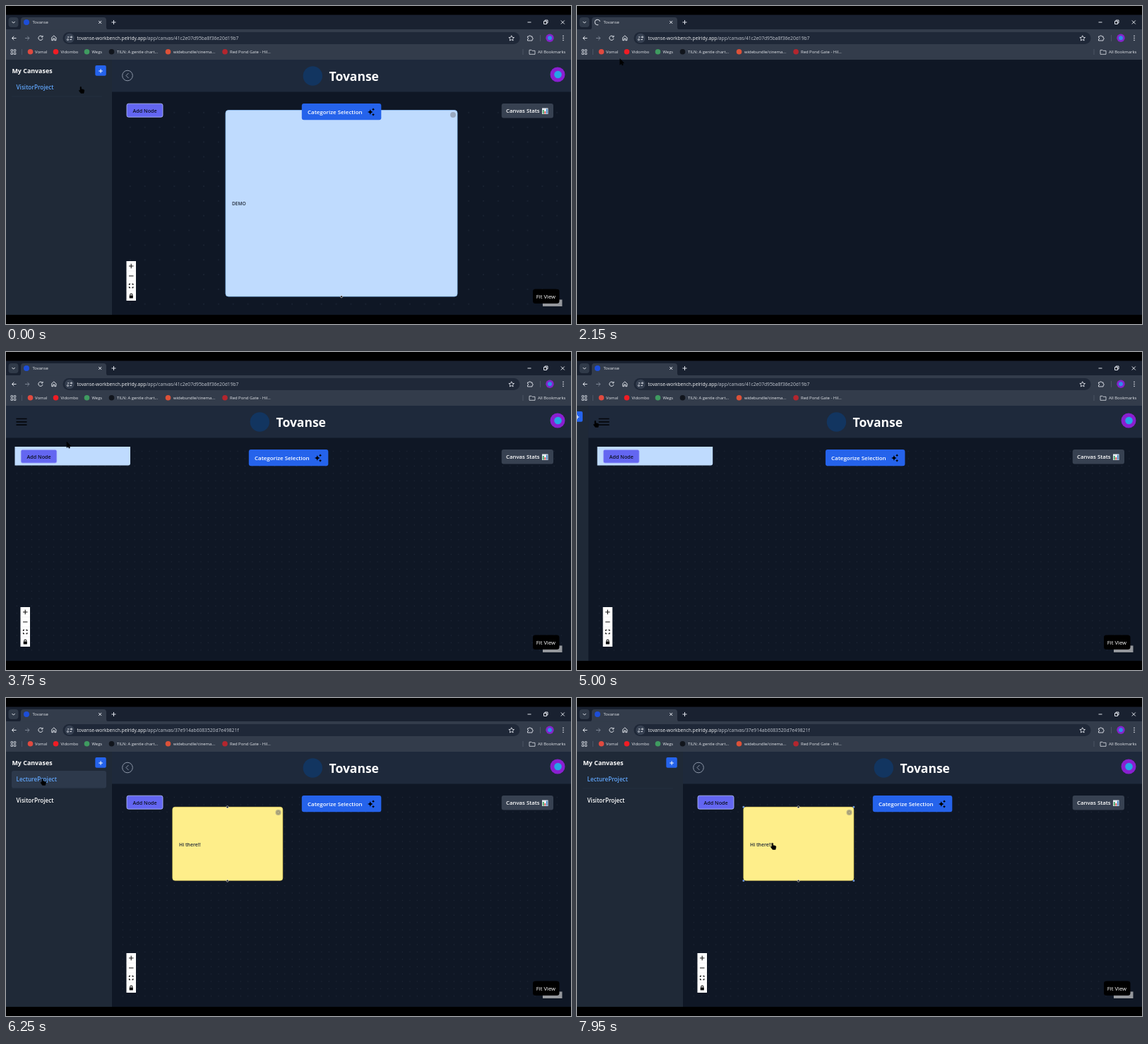
These frames come from a looping animation (800x450 px, 8000 ms). An HTML page:

```html
<!DOCTYPE html>
<html lang="en">
<head>
<meta charset="utf-8">
<title>Canvas workspace</title>
<style>
html, body { margin: 0; width: 100%; height: 100%; overflow: hidden; background: #000; }
svg { display: block; width: 100vw; height: 100vh; }
text { font-family: "Open Sans", "Noto Sans", sans-serif; fill: #fff; white-space: pre; }
.semi { font-weight: 600; }
.bold { font-weight: 700; }
.small text { font-size: 5.9px; fill: #e3e6eb; }
.line { fill: none; stroke: #dfe3ea; stroke-width: 1; }
.dark { fill: none; stroke: #111; stroke-width: 1.1; }
</style>
</head>
<body>
<svg viewBox="0 0 800 450">
  <defs>
    <pattern id="dots" width="10.42" height="10.42" patternUnits="userSpaceOnUse">
      <circle cx="5" cy="5" r=".5" fill="#2d3748"/>
    </pattern>
    <pattern id="bigDots" width="20.84" height="20.84" patternUnits="userSpaceOnUse">
      <circle cx="5" cy="5" r=".7" fill="#263142"/>
    </pattern>
    <path id="star" d="M0-4Q.6-.6 4 0Q.6.6 0 4Q-.6.6-4 0Q-.6-.6 0-4Z"/>
    <clipPath id="stage"><rect y="76" width="800" height="361"/></clipPath>
  </defs>
  <rect width="800" height="450"/>

  <g id="page" clip-path="url(#stage)">
    <rect y="76" width="800" height="361" fill="#0f1725"/>

    <g id="loading">
      <path id="spinner" d="M11.3-11.3A16 16 0 1 1-11.3-11.3" fill="none" stroke="#3b82f6" stroke-width="2.2"/>
      <text id="loadingText" x="400" y="281" font-size="8.7" text-anchor="middle">Loading Tovanse...</text>
    </g>

    <g id="app">
      <g class="full">
        <rect id="grid" x="12" y="134" width="775" height="291" fill="url(#dots)"/>
      </g>
      <rect y="76" width="800" height="45.5" fill="#1e293b"/>

      <g id="bigNode">
        <rect x="311" y="147.5" width="328" height="263.5" rx="4" fill="#bfdbfe" stroke="#93c5fd" stroke-width=".8"/>
        <circle cx="633" cy="154" r="4" fill="#9aa9bf"/>
        <circle cx="475" cy="411.3" r="1.5" fill="#111" stroke="#fff" stroke-width=".6"/>
        <text class="semi" x="320" y="282" font-size="6.6" style="fill:#1f2937">DEMO</text>
      </g>
      <path id="cutNode" class="full" d="M12.5 134H176V157.500Q176 160.500 173 160.500H12.500Z" fill="#bfdbfe"/>
      <g id="note">
        <rect x="235.800" y="154.300" width="156" height="104" rx="3.500" fill="#feee8a" stroke="#f3dc62" stroke-width=".6"/>
        <circle cx="385.500" cy="162" r="4" fill="#b9b184"/>
        <circle cx="385.500" cy="162" r="2" fill="none" stroke="#8d8868" stroke-width=".7"/>
        <g fill="#111" stroke="#fff" stroke-width=".6">
          <circle cx="313.500" cy="154.300" r="1.500"/><circle cx="313.500" cy="258.700" r="1.500"/>
        </g>
        <path id="corners" d="M234.800 153.300h2v2h-2zM390.800 153.300h2v2h-2zM234.800 257.500h2v2h-2zM390.800 257.500h2v2h-2z" fill="#3b82f6" stroke="#fff" stroke-width=".3"/>
        <text class="semi" x="245" y="209.500" font-size="6.900" style="fill:#1f2937">Hi there!!</text>
      </g>

      <g class="full">
        <rect x="21" y="138.200" width="51" height="19" rx="2.500" fill="#6366f1" stroke="#b4c0fb" stroke-width=".8"/>
        <text class="semi" x="29.500" y="150.800" font-size="7.200" style="fill:#0b1020">Add Node</text>
        <path d="M20.500 361H34V417H20.500Z" fill="#fff"/>
        <path d="M20.500 375H34M20.500 389H34M20.500 403H34" stroke="#e5e7eb" stroke-width=".5"/>
        <path class="dark" d="M24 368H30.500M27.200 364.800V371.200M24 382H30.500M24.500 395V393.300H26.200M28.200 393.300H29.900V395M29.900 397V398.700H28.200M26.200 398.700H24.500V397"/>
        <path d="M24.700 409.500H29.800V413.500H24.700Z"/>
        <path class="dark" d="M25.800 409.500V408.500a1.500 1.500 0 0 1 3 0V409.500"/>
        <path id="menu" d="M14.500 94.500H29.500M14.500 98.800H29.500M14.500 103.100H29.500" stroke="#05070c" stroke-width="1.700"/>
        <g id="back" class="line" stroke-width=".9">
          <circle cx="22" cy="98.500" r="7.300" stroke="#8d97a8"/><path d="M23.500 95L20 98.500L23.500 102" stroke="#8d97a8"/>
        </g>
      </g>

      <g class="half">
        <circle cx="359.300" cy="99" r="13.700" fill="#123560"/>
        <text class="bold" x="382.500" y="106.300" font-size="17.500">Tovanse</text>
        <rect x="343.800" y="138" width="112.500" height="23.300" rx="3" fill="#2563eb"/>
        <text class="semi" x="352" y="152.900" font-size="7.950">Categorize Selection</text>
        <use href="#star" x="440.800" y="150"/>
        <use href="#star" transform="translate(445 146.300) scale(.5)"/>
        <use href="#star" transform="translate(445 153.800) scale(.5)"/>
      </g>

      <circle cx="781" cy="97" r="10.500" fill="#8a1fd0"/>
      <circle cx="781.500" cy="97" r="5.300" fill="#25a5e6"/>
      <rect x="701.700" y="138" width="73.300" height="20.500" rx="3" fill="#374151"/>
      <text class="semi" x="708" y="151.300" font-size="7.800">Canvas Stats</text>
      <path d="M759 144.500H767.500V153H759Z" fill="#e8edf3"/>
      <path d="M760.800 152.500V147" stroke="#37a05a" stroke-width="1.700"/>
      <path d="M763.300 152.500V149" stroke="#d84a4a" stroke-width="1.700"/>
      <path d="M765.800 152.500V145.500" stroke="#3b82c4" stroke-width="1.700"/>
      <path d="M760 415.500H787.500V425H760Z" fill="#94979c"/>
      <rect x="746" y="400.500" width="37.500" height="20.500" rx="3.500"/>
      <text x="750.800" y="413.600" font-size="7.700">Fit View</text>

      <g id="sidebar">
        <path d="M0 76H150V437H0Z" fill="#1f2937"/>
        <text class="bold" x="8.500" y="94.500" font-size="8.900">My Canvases</text>
        <rect x="126.300" y="84" width="15.500" height="14.700" rx="2" fill="#2563eb"/>
        <path d="M131.300 92H136.900M134.100 89.200V94.800" stroke="#fff" stroke-width="1"/>
        <rect id="row" x="8" y="103" width="134" height="24.500" rx="3" fill="#2d394b"/>
        <path d="M8 128H136" stroke="#263244" stroke-width=".7"/>
        <text id="first" class="semi" x="14.500" y="118.300" font-size="8.200"></text>
        <text id="second" class="semi" x="14.500" y="147.600" font-size="8.200">VisitorProject</text>
      </g>
    </g>
  </g>

  <g class="small">
    <path d="M0 12.500H800V34H0Z" fill="#192130"/>
    <path d="M0 33H800V76H0Z" fill="#333c4b"/>
    <path d="M18 33.500Q21 33 21 30V20Q21 16 25 16H138Q142 16 142 20V30Q142 33 145 33.500Z" fill="#333c4b"/>
    <rect x="3.500" y="16" width="14" height="14" rx="4" fill="#303a49"/>
    <path class="line" d="M8.500 22L10.600 24.200L12.700 22M131.200 21L135.200 25M135.200 21L131.200 25M149.500 23H155.500M152.500 20V26M738.500 23H743.500M761.500 21.500H765.500V25.500H761.500ZM763 21.500V20H767V24H765.500M785.800 20.500L790.800 25.500M790.800 20.500L785.800 25.500"/>
    <circle id="favicon" cx="29" cy="23" r="4" fill="#1d4ed8"/>
    <path id="tabSpinner" class="line" d="M0-3.700A3.700 3.700 0 1 1-3.700 0"/>
    <text x="37.500" y="25.300">Tovanse</text>

    <circle id="reloadHover" cx="49" cy="45.500" r="8.500" fill="#535e70"/>
    <path class="line" d="M14.500 45.500H8.500M11.300 42.700L8.500 45.500L11.300 48.300M51.500 43.500A3.100 3.100 0 1 0 52 46M52 41.800V44H49.800M64.800 45.500V48.700H66.800V46H68.800V48.700H70.800V45.500M64 45.500L67.800 42L71.600 45.500"/>
    <path class="line" d="M27 45.500H33M30.200 42.700L33 45.500L30.200 48.300" style="stroke:#7b8493"/>
    <rect x="80.500" y="37" width="647" height="17" rx="8.500" fill="#1f2838"/>
    <circle cx="90" cy="45.500" r="6.700" fill="#364051"/>
    <path class="line" d="M87 44H89.500M91.500 44a1 1 0 1 0 2 0a1 1 0 1 0-2 0M90.500 47.500H93M86.500 47.500a1 1 0 1 0 2 0a1 1 0 1 0-2 0"/>
    <text x="100.500" y="48" style="font-size:6.700px;fill:#f4f5f7">tovanse-workbench.pelridy.app<tspan id="path" fill="#c3c8d1"></tspan></text>
    <path class="line" stroke-linejoin="round" d="M715.700 41.800L716.800 44.300L719.500 44.600L717.500 46.400L718.100 49L715.700 47.600L713.300 49L713.900 46.400L711.900 44.600L714.600 44.300ZM738.500 43H740.500a1.200 1.200 0 0 1 2.400 0H745V45a1.200 1.200 0 0 1 0 2.400V49H738.500V47a1.100 1.100 0 0 0 0-2.200Z" style="stroke-width:.9"/>
    <path d="M756.500 41V50M22.500 61V69M732 61V69" stroke="#566071" stroke-width=".7"/>
    <circle cx="770" cy="45.300" r="5.700" fill="#8523c9"/><circle cx="770" cy="45.300" r="3" fill="#2f8ce8"/>
    <path d="M789 42.300v.1M789 45.300v.1M789 48.300v.1" stroke="#dfe3ea" stroke-width="1.500" stroke-linecap="round"/>

    <path class="line" d="M7 61.700H9.500V64.200H7ZM11.300 61.700H13.800V64.200H11.300ZM7 66H9.500V68.500H7ZM11.300 66H13.800V68.500H11.300ZM741 62.300H744L745 63.300H749V68.300H741Z" style="stroke-width:.8"/>
    <g id="bookmarks"></g>
    <text x="753" y="67.200">All Bookmarks</text>
  </g>

  <g id="cursor" stroke="#000" stroke-width=".5" stroke-linejoin="round">
    <path id="arrow" d="M0 0V8.500L2 6.800L3.200 9.300L4.600 8.600L3.500 6.200H6Z"/>
    <path id="hand" d="M1 .7Q1.800-.3 2.600.7V3.500L6 4.300Q7 4.700 6.800 6L6 9.500H2L-.6 6Q-.8 4.800 1 5.500Z"/>
  </g>
</svg>
<script>
const $ = id => document.getElementById(id);
const show = (id, on) => $(id).setAttribute('display', on ? 'inline' : 'none');
const move = (el, x, y = 0, turn = 0) => el.setAttribute('transform', `translate(${x} ${y}) rotate(${turn})`);
const ease = k => (k = Math.min(1, Math.max(0, k)), k * k * (3 - 2 * k));

// Icon x, text x, icon colour, label
$('bookmarks').innerHTML = [
  [34.5, 41, '#e04a3f', 'Vomal'],
  [70.5, 77.5, '#f01c24', 'Vidombo'],
  [114.5, 121.5, '#3f9b60', 'Wegs'],
  [149.5, 157, '#11151c', 'TILN: A gentle chart...'],
  [229.5, 237, '#dc5138', 'widebundle/cinema...'],
  [310, 317, '#b3262e', 'Red Pond Gate - Hil...']
].map(([icon, x, color, label]) =>
  `<circle cx="${icon}" cy="64.800" r="3.800" fill="${color}"/><text x="${x}" y="67.200">${label}</text>`).join('');

// Pointer stops: time, x, y
const stops = [
  [0, 104, 114], [1000, 104, 114], [1450, 47, 46], [1850, 47, 46], [2600, 86, 127], [3800, 86, 127],
  [4450, 24, 97], [5000, 24, 97], [5350, 33, 116], [5700, 33, 116], [6600, 58, 113], [7050, 58, 113],
  [7800, 275, 205], [8000, 275, 205]
];
function pointer(t) {
  const i = stops.findIndex(s => s[0] > t);
  const [t0, x0, y0] = stops[i - 1], [t1, x1, y1] = stops[i];
  const k = ease((t - t0) / (t1 - t0));
  return [x0 + (x1 - x0) * k, y0 + (y1 - y0) * k];
}

function render(t) {
  const [x, y] = pointer(t);
  const before = t < 1900, loaded = t >= 3450, opened = t >= 6000;
  const open = before ? 1 : ease((t - 4950) / 250);

  show('app', before || loaded);
  show('loading', t >= 2900 && !loaded);
  move($('spinner'), 400, 245, (t - 2925) * .36);
  $('loadingText').setAttribute('opacity', .2 + .08 * Math.cos((t - 2900) / 2000 * 2 * Math.PI));

  document.querySelectorAll('.full').forEach(el => move(el, 150 * open));
  document.querySelectorAll('.half').forEach(el => move(el, 75 * open));
  move($('sidebar'), -150 * (1 - open));
  show('menu', open < .5);
  show('back', open >= .5);
  $('grid').setAttribute('width', 775 - 150 * open);
  $('grid').setAttribute('fill', before ? 'url(#bigDots)' : 'url(#dots)');

  show('bigNode', before);
  show('cutNode', loaded && !opened);
  show('note', opened);
  show('corners', x > 236 && y > 154);

  const picked = t >= 5300;
  $('first').textContent = before ? 'VisitorProject' : 'LectureProject';
  $('first').style.fill = before || picked ? '#60a5fa' : '#fff';
  $('second').style.fill = picked ? '#fff' : '#60a5fa';
  show('second', !before);
  show('row', t > 5000 && x > 8 && x < 142 && y > 103 && y < 127);

  const busy = t >= 1500 && t < 2550;
  show('favicon', !busy);
  show('tabSpinner', busy);
  move($('tabSpinner'), 29, 23, (1600 - t) * .36);
  show('reloadHover', Math.hypot(x - 49, y - 45.5) < 8.5);
  $('path').textContent = '/app/canvas/' + (opened ? '37e914ab6083520d7e49821f' : '41c2e07d95ba8f36e20d19b7');

  const hand = t < 1100 || t > 4300;
  show('hand', hand);
  show('arrow', !hand);
  move($('cursor'), x, y);
}

function frame() {
  render(performance.now() % 8000);
  requestAnimationFrame(frame);
}
frame();
</script>
</body>
</html>
```
